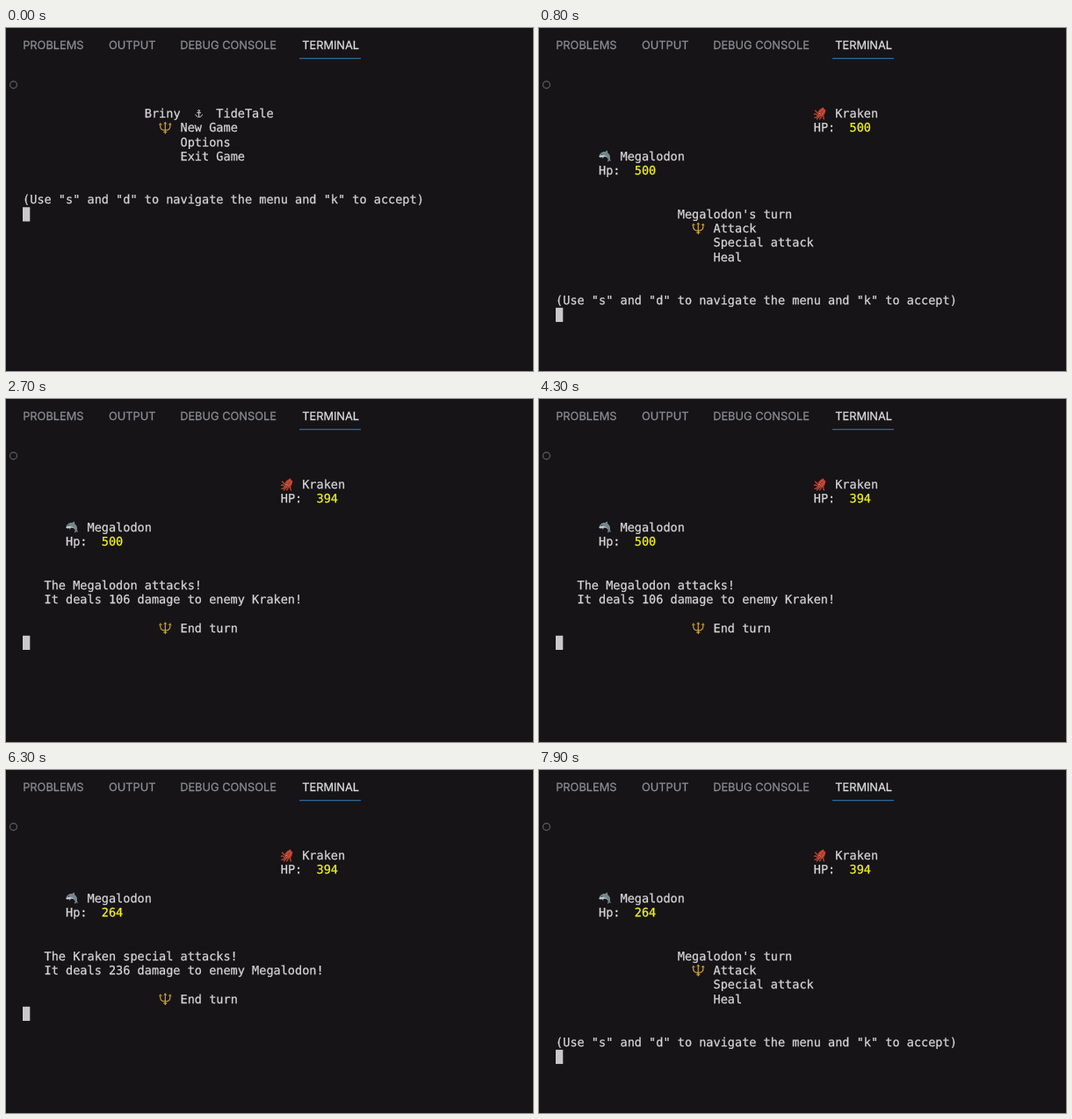
An HTML page that plays this animation: 600x391 px, repeating every 8 s.

```html
<!DOCTYPE html>
<html lang="en">
<head>
<meta charset="utf-8">
<title>Terminal sea battle</title>
<style>
  html, body { margin: 0; width: 100%; height: 100%; overflow: hidden; background: #161417; }
  svg { display: block; width: 100vw; height: 100vh; }
  text { white-space: pre; text-rendering: geometricPrecision; stroke-width: .25px; }
  .tabs { font: 12.8px Inter, sans-serif; fill: #8b8e90; stroke: #8b8e90; }
  .tabs .active { fill: #dededf; stroke: #dededf; }
  .screen { font: 13.55px "DejaVu Sans Mono", monospace; }
  .screen text { fill: #d6d5d6; stroke: #d6d5d6; }
  .screen .hp { fill: #f3f31c; stroke: #f3f31c; }
  .cursor { fill: #c9c8ca; }
</style>
</head>
<body>
<svg viewBox="0 0 600 391">
  <defs>
    <g id="trident" fill="none" stroke="#d9a936" stroke-width="1.15" stroke-linecap="round" stroke-linejoin="round">
      <path d="M0-5.5V6.5M-5.4-4C-6.4 1.2-4.2 2.8 0 2.8S6.4 1.2 5.4-4M-1.6 4.8H1.6"/>
      <path d="M-1.3-4.4 0-6.4 1.3-4.4M-6.6-3.2-5.6-5.3-4-3.5M6.6-3.2 5.6-5.3 4-3.5" stroke-width=".8"/>
    </g>
    <g id="anchor" fill="none" stroke="#d0cfd0" stroke-linecap="round">
      <circle cy="-2.9" r="1"/>
      <path d="M0-1.8V4.2M-2-.6H2M-3.7 1.6C-3.2 3.4-1.8 4.1 0 4.2 1.8 4.1 3.2 3.4 3.7 1.6"/>
    </g>
    <g id="squid" stroke-linecap="round">
      <path d="M-2 0C-4 0-4-3-5.5-3M-2 2C-4 2-5 0-6.5 1M-1 3C-4 3-4 5-6 5M0 3C-1 5-3 4-3.5 6.5M2 3C1 4 1 6-.5 6.5M3 2C5 3 3 5 4.5 6.5" fill="none" stroke="#b8442f" stroke-width="1.4"/>
      <path d="M-2.5 1C-3-3 0-5 4-7L4.5-5 6.5-4C6 0 5 3 1.5 4Z" fill="#b53a2a"/>
      <path d="M-.5-1.5C1-4 3-4.5 4-5M2 2C4 0 4.5-2 4.8-3" fill="none" stroke="#d66a4e" stroke-width=".8"/>
      <circle cx="-.6" cy="1" r="1" fill="#e3c6b3"/>
      <circle cx="-.7" cy="1.1" r=".55" fill="#251417"/>
    </g>
    <g id="shark">
      <path d="M-7 0C-6-4-3-5.5 0-5.3L2.6-7 3-4.2C5.5-2.5 6.2 0 5.6 3L7 5.2 4.8 4.9 2.6 6.3 3.4 3C2.6 1 1 0-1 0L-2.6 2.8-3.4.6Z" fill="#74868d"/>
      <path d="M-7 0C-4-2.2 1-2 3.6 2.6 1.4 0-1-.3-3.2.8L-6 1.2Z" fill="#c6cfd2"/>
      <circle cx="-3.8" cy="-2.4" r=".6" fill="#182024"/>
    </g>
  </defs>

  <rect width="600" height="391" fill="#161417"/>
  <g class="tabs">
    <text x="19.2" y="24.4">PROBLEMS</text>
    <text x="116.9" y="24.4">OUTPUT</text>
    <text x="198.2" y="24.4">DEBUG CONSOLE</text>
    <text x="337.2" y="24.4" class="active">TERMINAL</text>
  </g>
  <rect x="334" y="34" width="70" height="1.3" fill="#2a689c"/>
  <circle cx="8.5" cy="64.7" r="4" fill="none" stroke="#555356" stroke-width="1.4"/>
  <g class="screen" id="screen"></g>
</svg>

<script>
const LOOP = 8000;
const colX = col => 19.1 + col * 8.157;
const rowY = row => 102 + row * 16.37;

const line = (col, row, text, cls = "") =>
  `<text x="${colX(col)}" y="${rowY(row)}" class="${cls}">${text}</text>`;
const icon = (name, col, row) =>
  `<use href="#${name}" x="${colX(col) + 7.2}" y="${rowY(row) - 4.7}"/>`;
const cursor = row =>
  `<rect class="cursor" x="19" y="${rowY(row) - 12.3}" width="8.3" height="16.2"/>`;
const prompt = row =>
  line(0, row, '(Use "s" and "d" to navigate the menu and "k" to accept)') + cursor(row + 1);
const choices = (row, items) =>
  icon("trident", 19, row) + items.map((item, i) => line(22, row + i, item)).join("");

const title = () =>
  line(17, 0, "Briny") + icon("anchor", 23.7, 0) + line(27, 0, "TideTale") +
  choices(1, ["New Game", "Options", "Exit Game"]) + prompt(6);

const fighter = (sprite, name, label, hp, col, row) =>
  icon(sprite, col, row) + line(col + 3, row, name) +
  line(col, row + 1, label) + line(col + 5, row + 1, hp, "hp");

const fighters = (enemyHp, playerHp) =>
  fighter("squid", "Kraken", "HP:", enemyHp, 36, 0) +
  fighter("shark", "Megalodon", "Hp:", playerHp, 6, 3);

const turn = (enemyHp, playerHp) =>
  fighters(enemyHp, playerHp) + line(17, 7, "Megalodon's turn") +
  choices(8, ["Attack", "Special attack", "Heal"]) + prompt(13);

const report = (enemyHp, playerHp, action, result) =>
  fighters(enemyHp, playerHp) + line(3, 7, action) + line(3, 8, result) +
  choices(10, ["End turn"]) + cursor(11);

const scenes = [
  [0, title()],
  [700, turn(500, 500)],
  [2700, report(394, 500, "The Megalodon attacks!", "It deals 106 damage to enemy Kraken!")],
  [5000, report(394, 264, "The Kraken special attacks!", "It deals 236 damage to enemy Megalodon!")],
  [7500, turn(394, 264)]
];

const screen = document.getElementById("screen");
screen.innerHTML = scenes.map(([, markup]) => `<g visibility="hidden">${markup}</g>`).join("");
const layers = [...screen.children];
const start = performance.now();

function render() {
  const time = (performance.now() - start) % LOOP;
  const current = scenes.findLastIndex(([from]) => time >= from);
  layers.forEach((layer, i) =>
    layer.setAttribute("visibility", i === current ? "visible" : "hidden"));
  requestAnimationFrame(render);
}
render();
</script>
</body>
</html>
```
